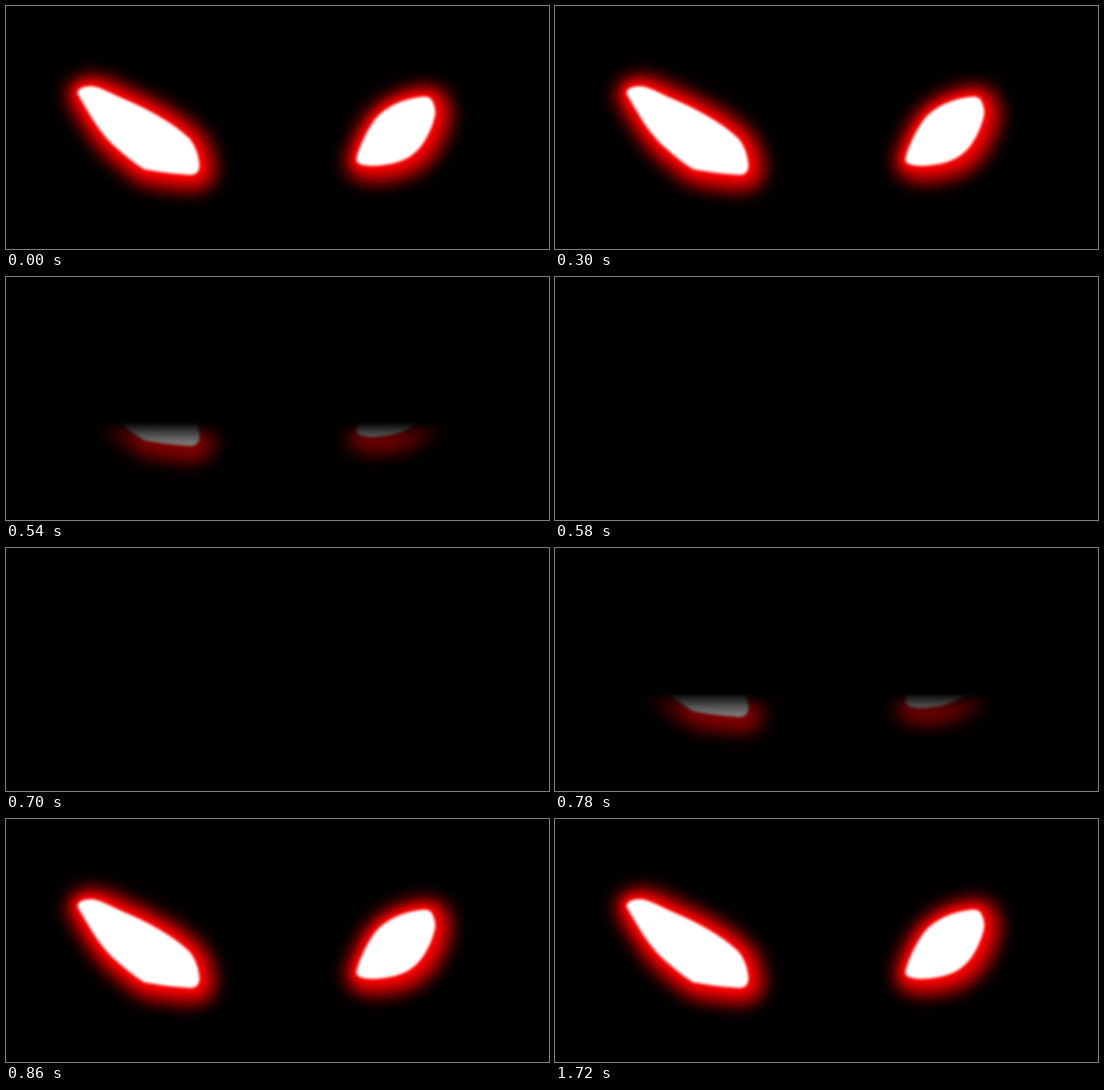
An HTML page for the animation above (2.3 s loop, 570 by 256 pixels).

```html
<!DOCTYPE html>
<html lang="en">
<head>
<meta charset="utf-8">
<title>Blinking eyes</title>
<style>
  html, body { margin: 0; width: 100%; height: 100%; overflow: hidden; background: #000; }
  svg, #lid { position: absolute; left: 0; top: 0; width: 570px; height: 256px; }
  .halo { fill: #e60000; stroke: #e60000; stroke-width: 28; stroke-linejoin: round; filter: blur(9px); }
  .rim { fill: #f00; stroke: #f00; stroke-width: 8; stroke-linejoin: round; filter: blur(4px); }
  .core { fill: #fff; filter: blur(1.6px); }
</style>
</head>
<body>
<svg viewBox="0 0 570 256">
  <defs>
    <g id="eyes">
      <path d="M75 92 Q76 84 90 84.500 C99 85 110 92 124 98 C148 108 174 122 192 139 C199 147 202 157 203 166 Q204 178 193 178 C178 177 160 175 145 172 C132 164 121 154 112 146 C96 130 87 113 75 92Z"/>
      <path d="M368 160 C371 148 379 131 387 120 C398 106 418 97 438 95.500 Q446 95 448 101 Q452 109 450 117 C446 132 440 144 431 153 C419 165 401 168 384 168.500 Q366 168 368 160Z"/>
    </g>
  </defs>
  <use href="#eyes" class="halo" x="3" y="3"/>
  <use href="#eyes" class="rim"/>
  <use href="#eyes" class="core"/>
</svg>
<div id="lid"></div>
<script>
const LOOP = 2300;
const lid = document.getElementById('lid');

// Each stop is [y, darkness]; the eyelid fades downwards from solid black.
const shade = (...stops) =>
  `linear-gradient(${stops.map(([y, dark]) => `rgba(0,0,0,${dark}) ${y}px`).join(',')})`;

const open = 'none';
const half = shade([122, 1], [132, .7], [145, .34], [158, .12], [172, 0]);
const low = shade([153, 1], [160, .84], [168, .66], [176, .52], [190, .42]);
const shut = '#000';

// [end time in ms, eyelid]
const blink = [
  [500, open], [540, half], [580, low], [780, shut],
  [820, low], [860, half], [LOOP, open]
];

function draw() {
  const t = performance.now() % LOOP;
  lid.style.background = blink.find(([end]) => t < end)[1];
  requestAnimationFrame(draw);
}
draw();
</script>
</body>
</html>
```
